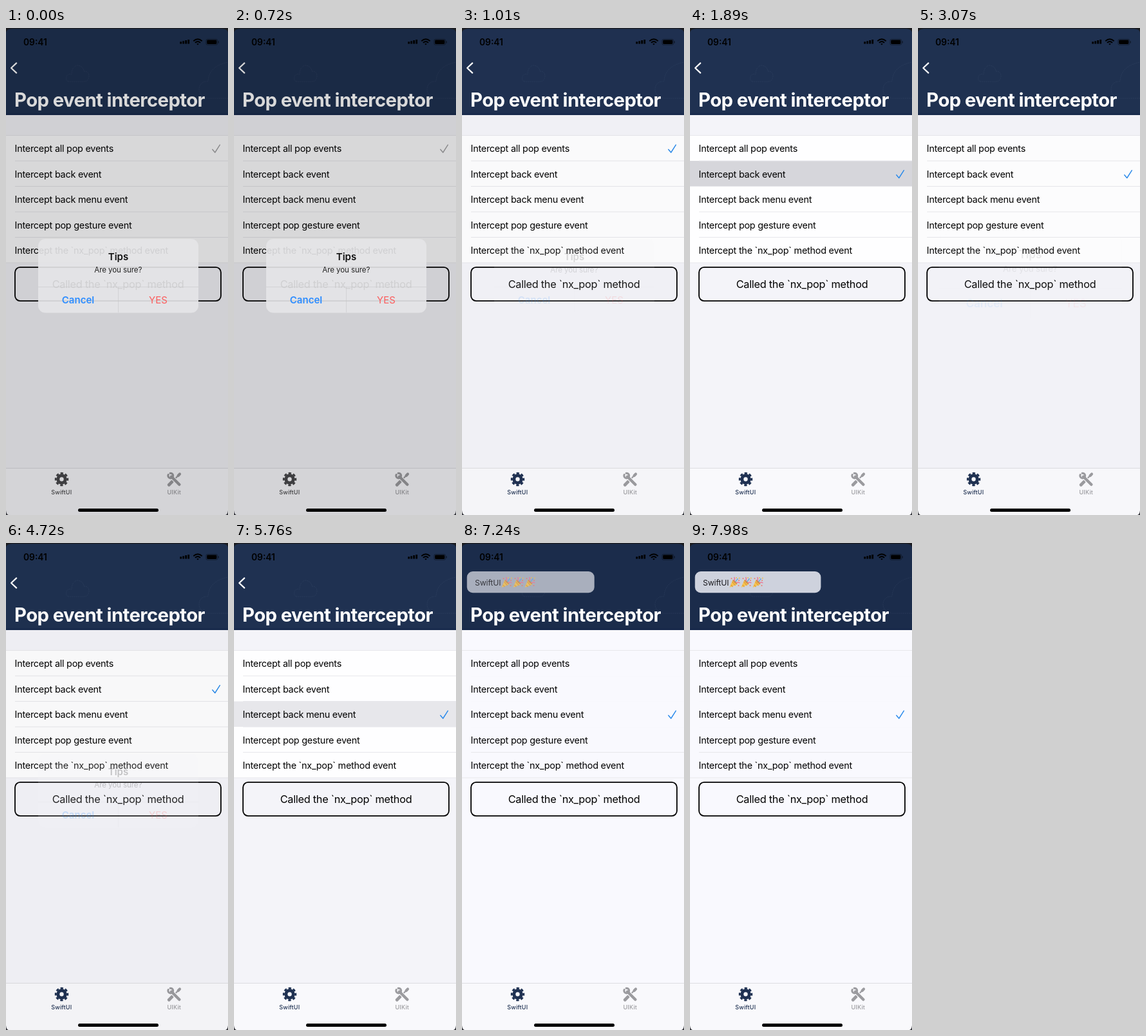
Animation of 345 by 755 pixels, one loop 8000 ms. Source, as an HTML page:

```html
<!DOCTYPE html>
<html lang="en">
<head>
<meta charset="utf-8">
<title>Pop event interceptor</title>
<style>
  html, body { margin: 0; width: 100%; height: 100%; overflow: hidden; background: #f5f5fa; }
  svg { display: block; width: 100vw; height: 100vh; font-family: Inter, Roboto, sans-serif; }
  .row { font-size: 14.4px; letter-spacing: -.016em; }
  .title { font-size: 29.3px; font-weight: 700; letter-spacing: -.02em; }
  .button { font-size: 16.3px; letter-spacing: -.0165em; }
  .tab { font-size: 9px; font-weight: 500; letter-spacing: .02em; }
  .bold { font-size: 15px; font-weight: 600; }
  .mid { text-anchor: middle; }
</style>
</head>
<body>
<svg viewBox="0 0 345 755" preserveAspectRatio="none">
  <defs>
    <g id="popper">
      <path d="M1 17 6 5 13 12Z" fill="#f6c452"/>
      <path d="M3 13 6 16M5 8 10 14" stroke="#e2a03c" stroke-width="1.2"/>
      <ellipse cx="9.4" cy="8.6" rx="1.4" ry="4.6" transform="rotate(-45 9.4 8.6)" fill="#cf9048"/>
      <path d="M8 7Q10 4 8 1M11 10Q14 8 17 10" fill="none" stroke="#ea7a9c" stroke-width="1.4"/>
      <path d="M10 8Q12 6 14 3" fill="none" stroke="#6aa9e0" stroke-width="1.4"/>
      <g fill="#ee7a6a"><circle cx="4" cy="3" r="1"/><circle cx="15.5" cy="6" r="1"/><circle cx="15" cy="14" r="1"/></g>
      <g fill="#f2bd45"><circle cx="11.5" cy="2" r="1"/><circle cx="16.3" cy="2.6" r="1"/></g>
    </g>
  </defs>

  <rect id="page" width="345" height="755"/>
  <rect id="list" y="167" width="345" height="197.5"/>
  <rect id="press" width="345" height="39.5" fill="#d6d6db"/>
  <g id="lines" stroke="#e7e7eb"></g>
  <g id="rows" class="row"></g>
  <path id="check" d="M320.8 188.2 324.8 193 332.4 181.2" fill="none" stroke-width="1.4" stroke-linecap="round" stroke-linejoin="round"/>
  <rect x="14" y="370.9" width="320" height="52.2" rx="8" fill="none" stroke="#000" stroke-width="1.8"/>
  <text x="174" y="402.5" class="button mid">Called the `nx_pop` method</text>

  <rect id="nav" width="345" height="135"/>
  <rect y="132" width="345" height="3" fill="#14264a" opacity=".45"/>
  <g fill="none" stroke="#5d6f8e" stroke-width=".8" stroke-dasharray="2 1" opacity=".22">
    <path d="M97 83Q92 81 94 75Q97 70 102 72Q102 60 111 58Q120 59 121 67Q129 67 129 75Q128 83 121 83Z"/>
    <path d="M345 109H314Q300 106 300 94Q302 82 314 83Q315 59 345 53"/>
  </g>
  <path id="back" d="M16.2 54.4 8.1 62 16.2 69.6" fill="none" stroke="#fff" stroke-width="2.2" stroke-linecap="round" stroke-linejoin="round"/>
  <text x="13" y="122" class="title" fill="#fff">Pop event interceptor</text>

  <rect y="682.5" width="345" height="72.5" fill="#f9f9fc"/>
  <path d="M0 682.5H345" stroke="#dddde1"/>
  <g id="active">
    <g fill="none" stroke="currentColor" transform="translate(86.5 699.5)">
      <circle r="5.7" stroke-width="5"/>
      <circle r="9.2" stroke-width="3" stroke-dasharray="4.2 3.026" stroke-dashoffset="2.1"/>
    </g>
    <text x="86.3" y="723" class="tab mid" fill="currentColor">SwiftUI</text>
  </g>
  <g fill="none" stroke="#9b9b9f" stroke-linecap="round">
    <path d="M269 692.5 258 703.5" stroke-width="2.2"/>
    <path d="M270 691.5 267.6 693.9" stroke-width="4.2"/>
    <path d="M258.2 703.3 253.3 708.2" stroke-width="4.8"/>
    <path d="M257 695.5 269.3 707.8" stroke="#f9f9fc" stroke-width="6.6"/>
    <path d="M257 695.5 269.3 707.8" stroke-width="4.4"/>
    <path d="M252.2 692.5A3.9 3.9 0 1 0 255.2 690.2" stroke-width="3"/>
  </g>
  <text x="261.3" y="723" class="tab mid" fill="#9b9b9f">UIKit</text>

  <rect id="dim" width="345" height="755"/>

  <text x="27" y="27" font-size="13.8" font-weight="600">09:41</text>
  <g stroke="#000" stroke-width="2.8">
    <path d="M271.7 24.5V21.3M275.7 24.5V20.3M279.7 24.5V19M283.7 24.5V18"/>
  </g>
  <g fill="none" stroke="#000" stroke-width="1.9">
    <path d="M291.3 20.2Q298 14.2 304.7 20.2M293.9 22.9Q298 19.3 302.1 22.9"/>
    <path d="M296.2 24.6 298 26.4 299.8 24.6Q298 23.4 296.2 24.6Z" fill="#000" stroke="none"/>
  </g>
  <rect x="310.8" y="17.3" width="18" height="9" rx="2.6" fill="none" stroke="#000" stroke-opacity=".4" stroke-width=".9"/>
  <rect x="312.2" y="18.6" width="15.2" height="6.4" rx="1.4"/>
  <path d="M330.2 20.2V23.6" stroke="#000" stroke-opacity=".5" stroke-width="1.2"/>
  <rect x="112" y="745" width="125" height="5" rx="2.5"/>

  <g id="alert">
    <g id="panel">
      <rect id="panelBox" x="50" y="327" width="249" height="114.5" rx="11" fill-opacity=".9"/>
      <path d="M50 401.5H299M174.5 402V441" stroke="#c4c4c8" stroke-width=".7" opacity=".75"/>
    </g>
    <g id="panelText" class="mid">
      <text x="174.5" y="360.3" class="bold" fill="#111">Tips</text>
      <text x="174.3" y="378.5" font-size="11.6" letter-spacing="-.01em" fill="#222">Are you sure?</text>
      <text x="112" y="427.3" class="bold" fill="#2d8dff">Cancel</text>
      <text x="236.5" y="427.3" font-size="15" fill="#fb5e5e">YES</text>
    </g>
  </g>

  <g id="menu">
    <rect id="menuBox" x="7.7" y="44" height="33.2" rx="9"/>
    <g id="menuText">
      <text x="20" y="65.5" font-size="12.2" letter-spacing="-.01em" fill="#1a1a1e">SwiftUI</text>
      <use href="#popper" x="60.5" y="52"/>
      <use href="#popper" x="78.5" y="52"/>
      <use href="#popper" x="96.5" y="52"/>
    </g>
  </g>

  <path d="M0 0H345V7Q344 1.4 336 1.2H9Q1 1.4 0 7Z" fill="#1b1c20"/>
  <path d="M0 748Q.6 754 4 755H0ZM345 748Q344.4 754 341 755H345Z" fill="#33343a"/>
</svg>
<script>
const LOOP = 8000, TOP = 167, ROW_H = 39.5;
const $ = id => document.getElementById(id);
const set = (id, attrs) => {
  for (const key in attrs) $(id).setAttribute(key, attrs[key]);
};

$('rows').innerHTML = [
  'Intercept all pop events', 'Intercept back event', 'Intercept back menu event',
  'Intercept pop gesture event', 'Intercept the `nx_pop` method event'
].map((label, i) => `<text x="13.5" y="${192 + i * ROW_H}">${label}</text>`).join('');
$('lines').innerHTML = [0, 1, 2, 3, 4, 5].map(i =>
  `<path d="M${i % 5 ? 14 : 0} ${TOP - .5 + i * ROW_H}H345"/>`).join('');

// Linear interpolation through [time, value] pairs
function track(t, keys) {
  if (t <= keys[0][0]) return keys[0][1];
  for (let i = 1; i < keys.length; i++) {
    const [a, u] = keys[i - 1], [b, v] = keys[i];
    if (t <= b) return u + (v - u) * (t - a) / (b - a);
  }
  return keys[keys.length - 1][1];
}
const mix = (a, b, k) => `rgb(${a.map((v, i) => Math.round(v + (b[i] - v) * k))})`;

function hold(t) {
  if (t < 4130) return Math.min(26, Math.floor((t + 15) / 146.4)) * 146.4;
  return 4130 + Math.floor((t - 4120) / 148) * 148;
}

function draw(now) {
  const t = hold(now % LOOP);

  const shown = track(t, [
    [0, 1], [760, 1], [878, .5], [1025, .1], [1171, 0],
    [3060, 0], [3221, .6], [3367, 1], [4430, 1], [4574, .55], [4722, .16], [4870, 0]
  ]);
  const zoom = t > 2500 && t < 3400 ? 1 + .15 * (1 - shown) : 1;
  set('alert', { transform: `translate(174.5 384) scale(${zoom}) translate(-174.5 -384)` });
  set('panel', { opacity: shown });
  set('panelBox', { fill: mix([244, 244, 248], [230, 230, 232], shown) });
  set('panelText', { opacity: Math.min(1, shown * 1.4) });
  set('dim', { opacity: .15 * shown });

  const muted = Math.max(0, shown * 2 - 1);
  const chosen = t < 1850 ? 0 : t < 5600 ? 1 : 2;
  set('check', {
    stroke: mix([38, 136, 235], [160, 160, 162], muted),
    transform: `translate(0 ${chosen * ROW_H})`
  });
  set('active', { color: mix([31, 49, 82], [72, 72, 75], muted) });

  const late = t > 4000;
  set('press', {
    y: TOP - .5 + (late ? 2 : 1) * ROW_H,
    opacity: track(late ? t - 3720 : t, [[1620, 0], [1750, 1], [1910, 1], [2200, 0]])
  });

  const menuMode = track(t, [[6500, 0], [7090, 1]]);
  set('page', { fill: mix([244, 244, 249], [249, 249, 254], menuMode) });
  set('list', { fill: mix([254, 254, 255], [249, 249, 254], menuMode) });
  set('nav', { fill: mix([31, 49, 81], [27, 44, 75], menuMode) });
  [...$('lines').children].forEach((line, i) =>
    line.setAttribute('opacity', i > 0 && i < 4 ? 1 - menuMode * .95 : 1));

  const open = track(t, [[6800, 0], [6950, .6], [7090, 1]]);
  const lit = track(t, [[7240, 0], [7540, 1]]);
  set('back', {
    opacity: track(t, [
      [2780, 1], [2930, .35], [3080, 1], [6200, 1], [6350, .4], [6800, .4], [6950, 0]
    ])
  });
  set('menu', {
    opacity: open,
    transform: `translate(8 61) scale(${.4 + .6 * open}) translate(-8 -61)`
  });
  set('menuBox', {
    width: 198 - 2.3 * lit,
    fill: mix([169, 175, 189], [206, 210, 221], lit)
  });
  set('menuText', { opacity: .8 + .2 * lit });
}

const start = performance.now();
function tick() {
  draw(performance.now() - start);
  requestAnimationFrame(tick);
}
tick();
</script>
</body>
</html>
```
